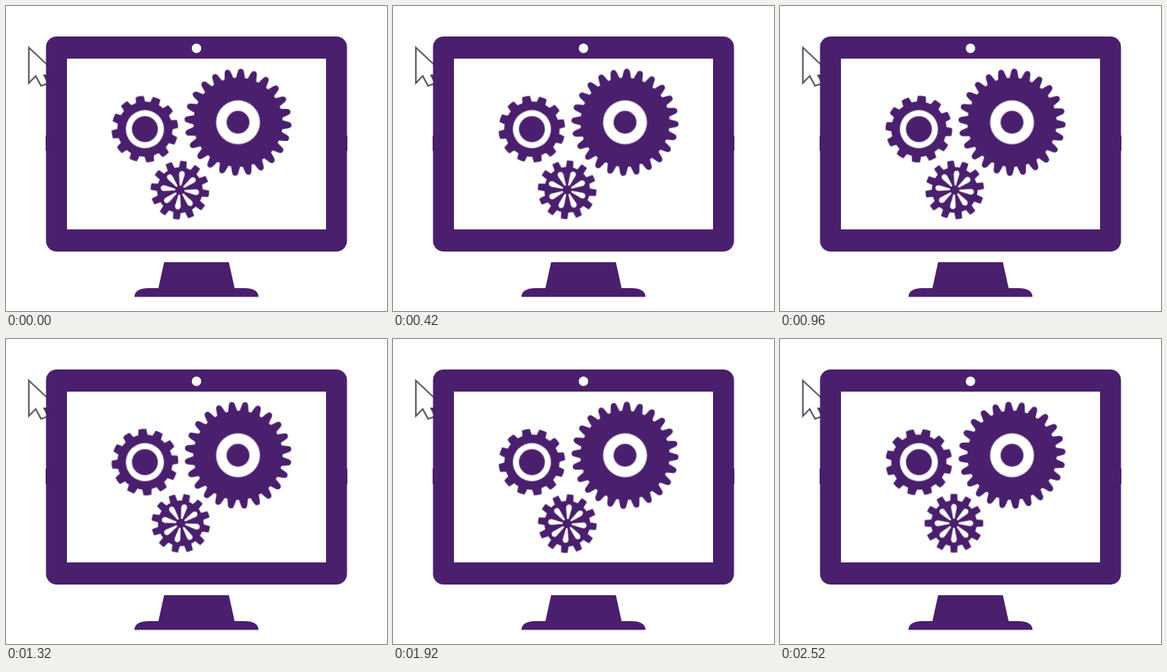
Recreate the animation shown at these times as an HTML page. Size 500x400 px, loop 2.55 s.

```html
<!DOCTYPE html>
<html lang="en">
<head>
<meta charset="utf-8">
<title>Gears at work</title>
<style>
  html, body { margin: 0; width: 100%; height: 100%; overflow: hidden; background: #fff; }
  svg { display: block; width: 500px; height: 400px; }
  .ink { fill: #4a1f6d; }
  .paper { fill: #fff; }
  .gear { animation: turn 2550ms steps(85, end) infinite; }
  .large { --from: 3.2deg; }
  .left { --from: -9.2deg; }
  .lower { --from: 7.2deg; transform-origin: 0.6px 0; }
  @keyframes turn {
    from { transform: rotate(var(--from)); }
    to { transform: rotate(calc(var(--from) + 357deg)); }
  }
</style>
</head>
<body>
<svg viewBox="0 0 500 400">
  <defs>
    <path id="arrow" d="M54 77 L30 54.5 V101 L39 91.8 L46 104.7 L54 102"/>
  </defs>
  <g fill="none">
    <use href="#arrow" stroke="#d3d0d8" stroke-width="3"/>
    <use href="#arrow" stroke="#504859" stroke-width="1.6"/>
    <path d="M55 90 H48.5 L54 101 Z" fill="#4a4256"/>
  </g>

  <rect class="ink" x="52.5" y="40" width="395" height="282" rx="14"/>
  <rect class="ink" x="52" y="170" width="396" height="20"/>
  <rect class="paper" x="80" y="69" width="340" height="224"/>
  <circle class="paper" cx="250" cy="55.5" r="6.2"/>
  <path class="ink" d="M207.5 336 H292.5 L300 370 H313 C325 370 331 374 331.5 381.5 H168.5 C169 374 175 370 187 370 H200 Z"/>

  <g transform="translate(304.5 152.5)">
    <g class="gear large ink" data-teeth="24" data-tooth="M-6.4 -56 L-3.9 -67 Q-3 -70.3 0 -70.3 Q3 -70.3 3.9 -67 L6.4 -56 Z">
      <circle r="58.5"/>
    </g>
    <circle class="paper" r="28.8"/>
    <circle class="ink" r="15"/>
  </g>

  <g transform="translate(182.3 161.5)">
    <g class="gear left ink" data-teeth="12" data-tooth="M-6.3 -34 L-5.2 -43.3 Q0 -44.2 5.2 -43.3 L6.3 -34 Z">
      <circle r="36.3"/>
    </g>
    <circle class="paper" r="25"/>
    <circle class="ink" r="17"/>
  </g>

  <g transform="translate(228.2 241.6)">
    <g class="gear lower ink" data-teeth="12" data-tooth="M-4.9 -28 L-4.3 -38.2 Q0 -38.8 4.3 -38.2 L4.9 -28 Z"
       data-holes="8" data-hole="M-1 -6 L-3.7 -20.5 C-4.3 -27 4.3 -27 3.7 -20.5 L1 -6 Z">
      <circle r="30"/>
    </g>
  </g>
</svg>
<script>
  function ring(gear, count, shape, style) {
    for (let i = 0; i < count; i++) {
      const part = document.createElementNS(gear.namespaceURI, 'path');
      part.setAttribute('d', shape);
      part.setAttribute('class', style);
      part.setAttribute('transform', `rotate(${i * 360 / count})`);
      gear.append(part);
    }
  }

  for (const gear of document.querySelectorAll('.gear')) {
    const { teeth, tooth, holes = 0, hole } = gear.dataset;
    ring(gear, +teeth, tooth, 'ink');
    ring(gear, +holes, hole, 'paper');
  }
</script>
</body>
</html>
```
